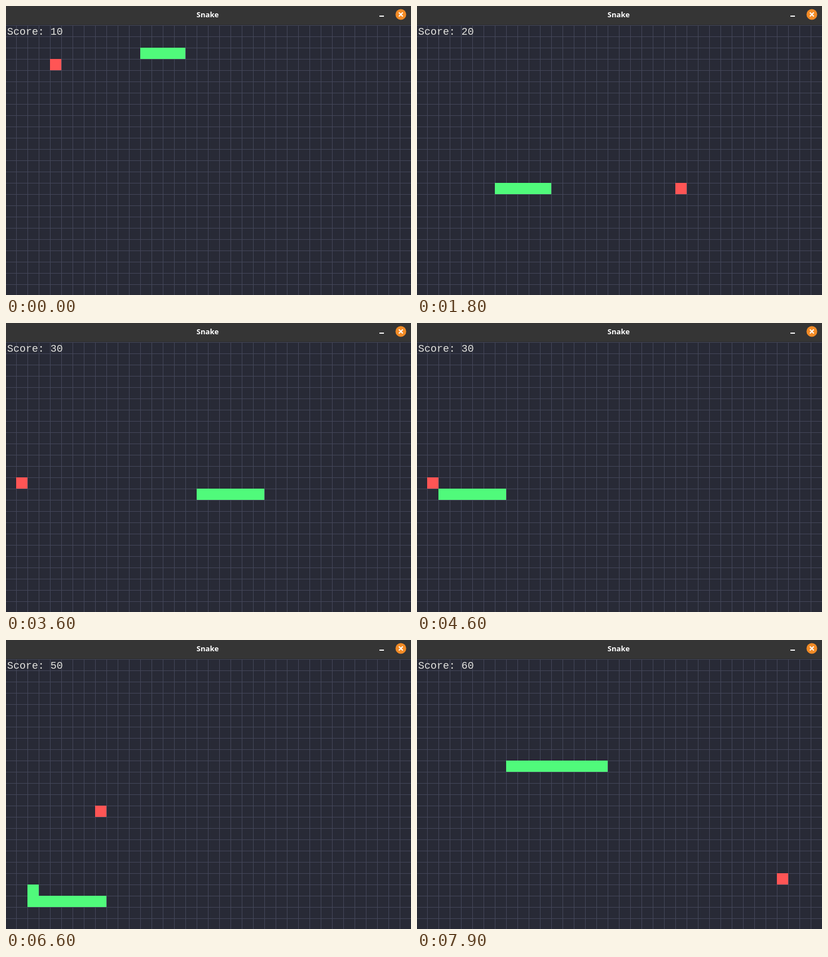
These frames come from a looping animation (718x513 px, 8 s). An HTML page with a canvas:

```html
<!DOCTYPE html>
<html lang="en">
<head>
<meta charset="utf-8">
<title>Snake</title>
<style>
  html, body { margin: 0; width: 100%; height: 100%; overflow: hidden; background: #282a36; }
  canvas { display: block; }
</style>
</head>
<body>
<canvas id="stage" width="718" height="513"></canvas>
<script>
const W = 718, H = 513, BAR = 34, CELL = 20;
const LOOP = 8000, TICK = 100, STEPS_PER_TICK = 1.512;
const ctx = document.getElementById('stage').getContext('2d');

// Corners of the route in grid cells, starting at the tail.
const corners = [
  [15, 2], [4, 2], [4, 14], [27, 14], [27, 13], [1, 13],
  [1, 6], [2, 6], [2, 21], [8, 21], [8, 9], [20, 9]
];
const START_LENGTH = 4;

// Each food appears at the step when the previous one is eaten.
const foods = [
  { step: 0, cell: [4, 3] },
  { step: 9, cell: [23, 14] },
  { step: 39, cell: [1, 12] },
  { step: 71, cell: [2, 21] },
  { step: 93, cell: [8, 13] },
  { step: 107, cell: [32, 19] }
];

function walk(points) {
  let [x, y] = points[0];
  const cells = [[x, y]];
  for (const [tx, ty] of points.slice(1)) {
    while (x !== tx || y !== ty) {
      x += Math.sign(tx - x);
      y += Math.sign(ty - y);
      cells.push([x, y]);
    }
  }
  return cells;
}
const route = walk(corners);

function fillCell([col, row], color) {
  ctx.fillStyle = color;
  ctx.fillRect(col * CELL - 2, BAR + row * CELL, CELL, CELL);
}

function drawBar() {
  ctx.fillStyle = '#353535';
  ctx.fillRect(0, 0, W, BAR - 1);
  ctx.fillStyle = '#2b2b2d';
  ctx.fillRect(0, BAR - 1, W, 1);

  ctx.fillStyle = '#fff';
  ctx.textAlign = 'center';
  ctx.font = '600 13px "Noto Sans", "Open Sans", sans-serif';
  ctx.fillText('Snake', 357.5, 20);
  ctx.fillRect(662, 17, 8, 2);

  ctx.fillStyle = '#f28b26';
  ctx.beginPath();
  ctx.arc(700, 15, 9.5, 0, Math.PI * 2);
  ctx.fill();
  ctx.strokeStyle = '#fff';
  ctx.lineWidth = 2;
  ctx.beginPath();
  ctx.moveTo(696.5, 11.5);
  ctx.lineTo(703.5, 18.5);
  ctx.moveTo(703.5, 11.5);
  ctx.lineTo(696.5, 18.5);
  ctx.stroke();
}

function drawGrid() {
  ctx.fillStyle = '#282a36';
  ctx.fillRect(0, BAR, W, H - BAR);
  ctx.fillStyle = '#44475a';
  for (let x = 18; x < W; x += CELL) ctx.fillRect(x, BAR, 1, H - BAR);
  for (let y = BAR; y < H; y += CELL) ctx.fillRect(0, y, W, 1);
}

function drawScore(score) {
  ctx.fillStyle = '#e4e4e0';
  ctx.textAlign = 'left';
  ctx.font = '18.3px "Liberation Mono", "Courier New", monospace';
  ctx.fillText('Score: ' + score, 2, 51);
}

function draw(time) {
  const tick = Math.floor((time % LOOP) / TICK);
  const step = Math.floor(tick * STEPS_PER_TICK);
  const shown = foods.filter(f => f.step <= step);
  // The body grows one step after a meal.
  const eaten = foods.filter(f => f.step > 0 && f.step < step).length;
  const head = step + START_LENGTH;

  drawGrid();
  drawBar();
  fillCell(shown[shown.length - 1].cell, '#ff5555');
  for (const cell of route.slice(head - START_LENGTH - eaten, head)) fillCell(cell, '#50fa7b');
  drawScore(shown.length * 10);
}

let origin;
function loop(now) {
  if (origin === undefined) origin = now;
  draw(now - origin);
  requestAnimationFrame(loop);
}
draw(0);
requestAnimationFrame(loop);
</script>
</body>
</html>
```
